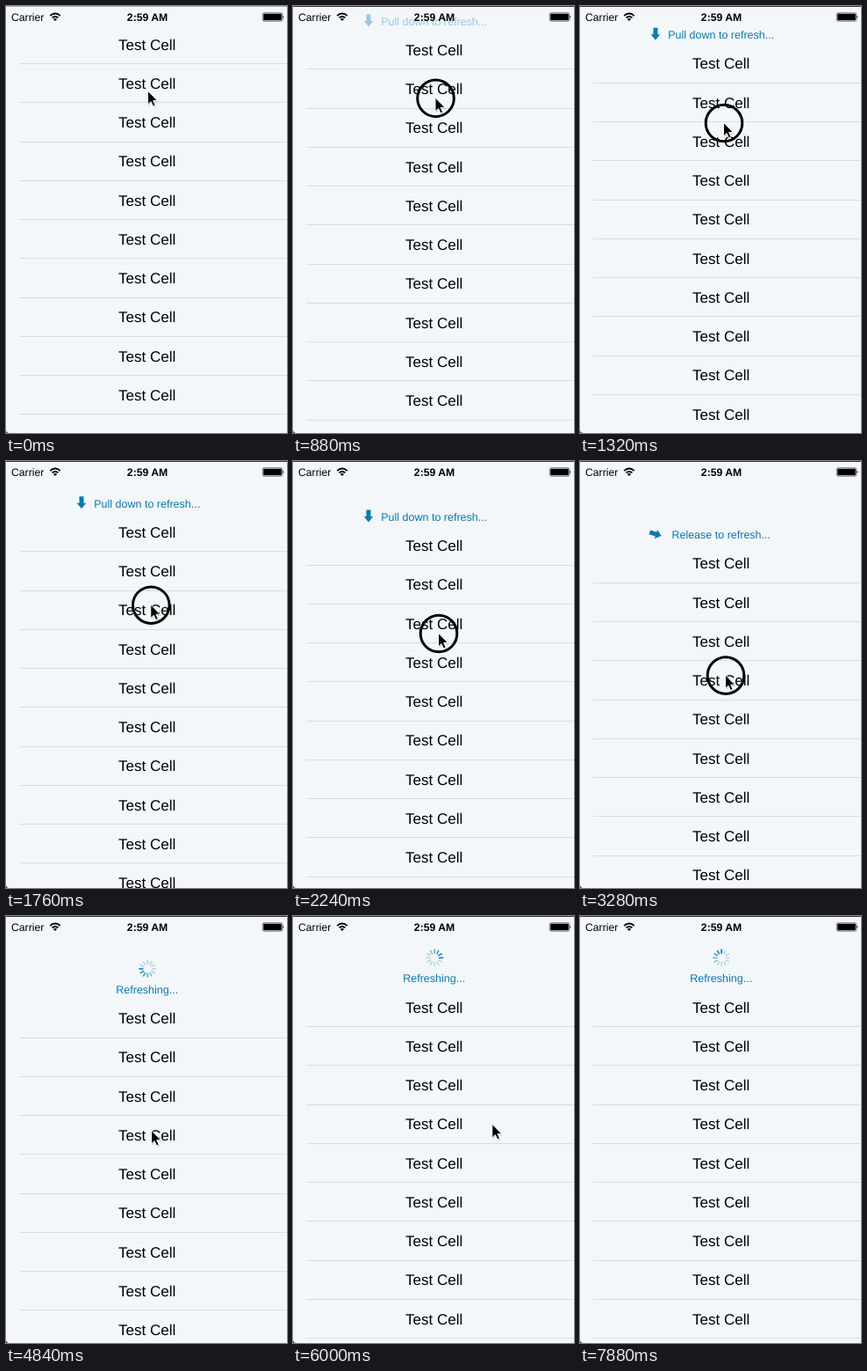
An HTML page for the animation above (8 s loop, 320 by 485 pixels).

```html
<!DOCTYPE html>
<html lang="en">
<head>
<meta charset="utf-8">
<title>Pull to refresh</title>
<style>
  html, body { margin: 0; width: 100%; height: 100%; overflow: hidden; background: #f3f7fa; }
  svg { display: block; width: 320px; height: 485px; }
  text { font-family: "Liberation Sans", Arial, sans-serif; text-rendering: geometricPrecision; }
  .cell { font-size: 17px; text-anchor: middle; }
  .status { font-size: 12.2px; }
  #label { font-size: 12.5px; text-anchor: middle; fill: #0a78ad; }
</style>
</head>
<body>
<svg viewBox="0 0 320 485" xmlns="http://www.w3.org/2000/svg">
  <rect width="320" height="485" fill="#f3f7fa"/>
  <g id="rows"></g>
  <g id="header">
    <text id="label" x="160.7" y="15.4"></text>
    <path id="arrow" d="M-2.5-7H2.5V.5H5.3L0 7-5.3.5H-2.5Z" fill="#0a7ab0"/>
    <g id="spinner" transform="translate(161.2 -12.5)" stroke="#0a7ab0" stroke-width="1.7" stroke-linecap="round"></g>
  </g>
  <g id="statusBar">
    <rect id="topEdge" width="320" height="1"/>
    <text class="status" x="6" y="16.8">Carrier</text>
    <text class="status" x="161" y="16.8" font-weight="bold" text-anchor="middle">2:59 AM</text>
    <g fill="none" stroke="#000" stroke-width="1.9">
      <path d="M50.2 11.1Q56 6.1 61.8 11.1M52.6 13.4Q56 10.5 59.4 13.4"/>
      <path d="M53.9 14.9Q56 13.3 58.1 14.9L56 17.1Z" fill="#000" stroke="none"/>
    </g>
    <rect x="292.25" y="7.75" width="22.5" height="9.5" rx="1.6" fill="none" stroke="#000" stroke-width=".5"/>
    <rect x="293.2" y="8.7" width="20.6" height="7.6" rx=".8"/>
    <path d="M315.3 10.8Q317.2 12.5 315.3 14.2Z"/>
  </g>
  <path d="M0 482Q.6 484.4 3 485H0Z" fill="#444"/>
  <g id="pointer">
    <circle id="ring" r="20.8" fill="none" stroke="#000" stroke-width="3"/>
    <g id="cursor" transform="translate(-.5 -.7)">
      <path d="M1 2V17L4.5 13.8 7 19 9.5 18 7.2 12.8H12Z" fill="#000" opacity=".18"/>
      <path d="M0 0V15.6L3.5 12.3 6 17.6 8.6 16.4 6.2 11.2H11Z" fill="#000" stroke="#fff" stroke-width="1"/>
    </g>
  </g>
</svg>
<script>
const LOOP = 8000, PITCH = 44.25;
const PRESS = 600, FLIP = 2730, FLIP_END = 4000, RELEASE = 4600, LEAVE = 6220;
const PETAL_STEP = 208.5, PETAL_START = 6415;

const el = id => document.getElementById(id);
const add = (parent, tag, attrs) => {
  const node = document.createElementNS("http://www.w3.org/2000/svg", tag);
  for (const name in attrs) node.setAttribute(name, attrs[name]);
  return parent.appendChild(node);
};
const clamp = v => Math.min(1, Math.max(0, v));
const ease = (t, from, to) => {
  const u = clamp((t - from) / (to - from));
  return u * u * (3 - 2 * u);
};

// Smooth curve through [time, value] keys, at rest at both ends.
function follow(keys, t) {
  const last = keys.length - 1;
  if (t <= keys[0][0]) return keys[0][1];
  if (t >= keys[last][0]) return keys[last][1];
  const i = keys.findIndex(k => k[0] > t) - 1;
  const slope = j => j <= 0 || j >= last ? 0 :
    (keys[j + 1][1] - keys[j - 1][1]) / (keys[j + 1][0] - keys[j - 1][0]);
  const [t0, a] = keys[i], [t1, b] = keys[i + 1];
  const d = t1 - t0, u = (t - t0) / d, w = u * u * (3 - 2 * u);
  return a + (b - a) * w + d * u * (1 - u) * ((1 - u) * slope(i) - u * slope(i + 1));
}

const dragX = [[600, 162], [1320, 164], [2240, 166]];
const dragY = [[600, 93.5], [1000, 112], [1320, 133], [2240, 196], [2730, 222], [3080, 236], [3320, 244]];
const leaveX = [[5780, 0], [6000, 61], [6200, 128], [6400, 174]];

for (let i = 0; i < 10; i++) {
  add(el("rows"), "text", { class: "cell", x: 160.7, y: 49.5 + i * PITCH }).textContent = "Test Cell";
  add(el("rows"), "rect", { x: 15, y: 65 + i * PITCH, width: 305, height: 1, fill: "#d9dde0", "shape-rendering": "crispEdges" });
}
const petals = Array.from({ length: 12 }, (_, i) =>
  add(el("spinner"), "line", { y1: -5.4, y2: -9.2, transform: `rotate(${i * 30})` }));

const pull = y => {
  const x = 0.58 * Math.max(0, y - 93.5);
  return x / (1 + x / 450);
};
const move = (id, x, y, extra = "") => el(id).setAttribute("transform", `translate(${x} ${y}) ${extra}`);
const show = (id, on) => el(id).setAttribute("visibility", on ? "visible" : "hidden");

function draw(t) {
  const refreshing = t >= RELEASE;
  const fingerY = follow(dragY, t);
  const held = pull(fingerY);
  const offset = held + (60 - held) * ease(t, 4720, 5660);

  el("topEdge").setAttribute("fill", t < PRESS ? "#a8abad" : "#333");
  move("rows", 0, offset);
  move("header", 0, offset);
  el("header").setAttribute("opacity", clamp((offset - 2) / 12));
  el("label").textContent = refreshing ? "Refreshing..." :
    t >= FLIP ? "Release to refresh..." : "Pull down to refresh...";

  show("arrow", !refreshing);
  move("arrow", 86, 10, `rotate(${-180 * ease(t, FLIP, FLIP_END)})`);

  show("spinner", refreshing);
  const head = Math.floor((t - PETAL_START) / PETAL_STEP) - 7;
  petals.forEach((petal, i) => {
    const age = ((head - i) % 12 + 12) % 12;
    petal.setAttribute("opacity", Math.max(0.25, 1 - age * 0.14));
  });

  const x = follow(dragX, t) + follow(leaveX, t);
  const y = t < PRESS ? 97 - 3.5 * ease(t, 40, 400) : fingerY - 7 * ease(t, 5780, 6000);
  show("pointer", t < LEAVE);
  el("ring").style.display = t >= PRESS && !refreshing ? "" : "none";
  move("pointer", x, y);
}

function tick() {
  draw(performance.now() % LOOP);
  requestAnimationFrame(tick);
}
tick();
</script>
</body>
</html>
```
